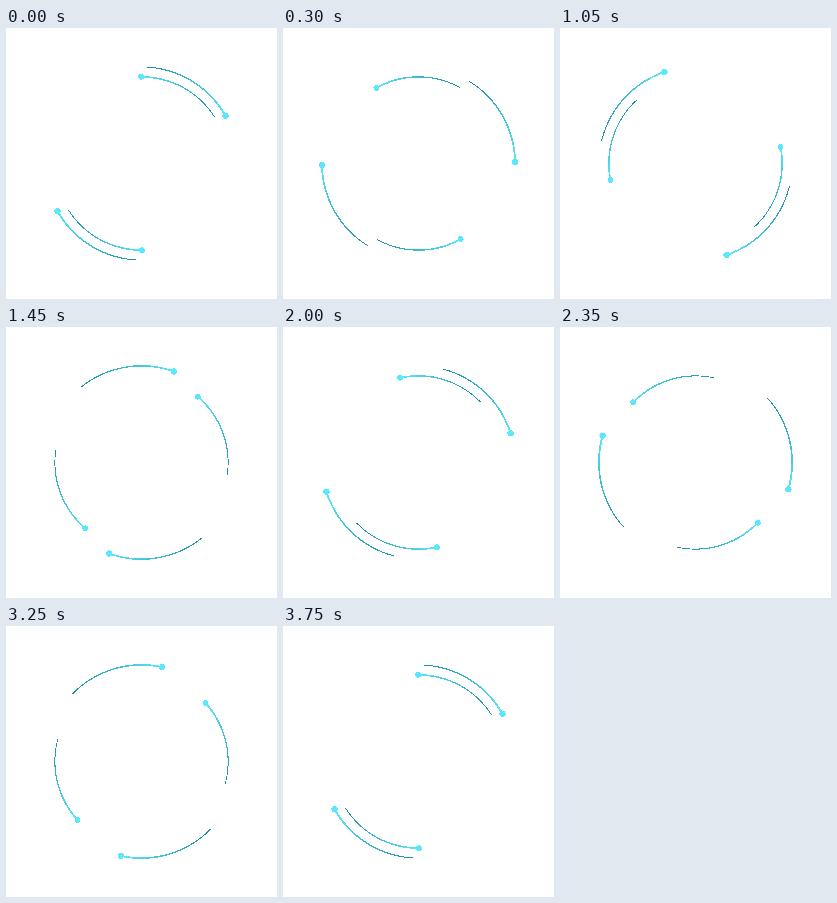
Write an HTML page with a canvas that moves like this. It is 271x271 px and loops after 3.8 s.

```html
<!DOCTYPE html>
<html lang="en">
<head>
<meta charset="utf-8">
<title>Orbit loader</title>
<style>
html, body { margin: 0; width: 100%; height: 100%; overflow: hidden; background: #fff; }
canvas { display: block; }
</style>
</head>
<body>
<canvas id="stage" width="271" height="271"></canvas>
<script>
const SIZE = 271, CENTER = SIZE / 2;
const STEP_MS = 50, STEPS = 76, TURN = 2 * Math.PI;
const HEAD = [92, 232, 252], TAIL = [28, 140, 160];
const ARC = 58 * Math.PI / 180;

// dir: 1 is clockwise, -1 counterclockwise
const rings = [
  { radius: 96.6, start: -29.6, dir: 1, dot: 3.2, wide: 1.9, thin: 0.9 },
  { radius: 86.6, start: -90.3, dir: -1, dot: 2.95, wide: 1.8, thin: 0.75 }
];

const ctx = document.getElementById('stage').getContext('2d');
const image = ctx.createImageData(SIZE, SIZE);

// Only pixels close to a ring can ever be painted.
for (const ring of rings) {
  ring.pixels = [];
  for (let y = 0; y < SIZE; y++) {
    for (let x = 0; x < SIZE; x++) {
      const dx = x + 0.5 - CENTER, dy = y + 0.5 - CENTER;
      const off = Math.abs(Math.hypot(dx, dy) - ring.radius);
      if (off < 4) ring.pixels.push({ at: 4 * (y * SIZE + x), dx, dy, off, angle: Math.atan2(dy, dx) });
    }
  }
}

function paint(at, fade) {
  for (let i = 0; i < 3; i++) image.data[at + i] = HEAD[i] + (TAIL[i] - HEAD[i]) * fade;
}

function drawRing(ring, turn) {
  const head = ring.start * Math.PI / 180 + ring.dir * turn;
  const hx = ring.radius * Math.cos(head), hy = ring.radius * Math.sin(head);
  for (const p of ring.pixels) {
    // The two comets are half a turn apart, so distance wraps at pi.
    const behind = (ring.dir * (head - p.angle) + 2 * TURN) % Math.PI;
    const fade = behind / ARC;
    const toDot = Math.min(Math.hypot(p.dx - hx, p.dy - hy), Math.hypot(p.dx + hx, p.dy + hy));
    if (toDot <= ring.dot) paint(p.at, 0);
    else if (fade <= 1 && p.off <= (ring.wide + (ring.thin - ring.wide) * fade) / 2) paint(p.at, fade);
  }
}

function frame() {
  const step = Math.floor(performance.now() / STEP_MS) % STEPS;
  const turn = step / (STEPS - 1) * TURN;
  image.data.fill(255);
  for (const ring of rings) drawRing(ring, turn % TURN);
  ctx.putImageData(image, 0, 0);
  requestAnimationFrame(frame);
}
frame();
</script>
</body>
</html>
```
